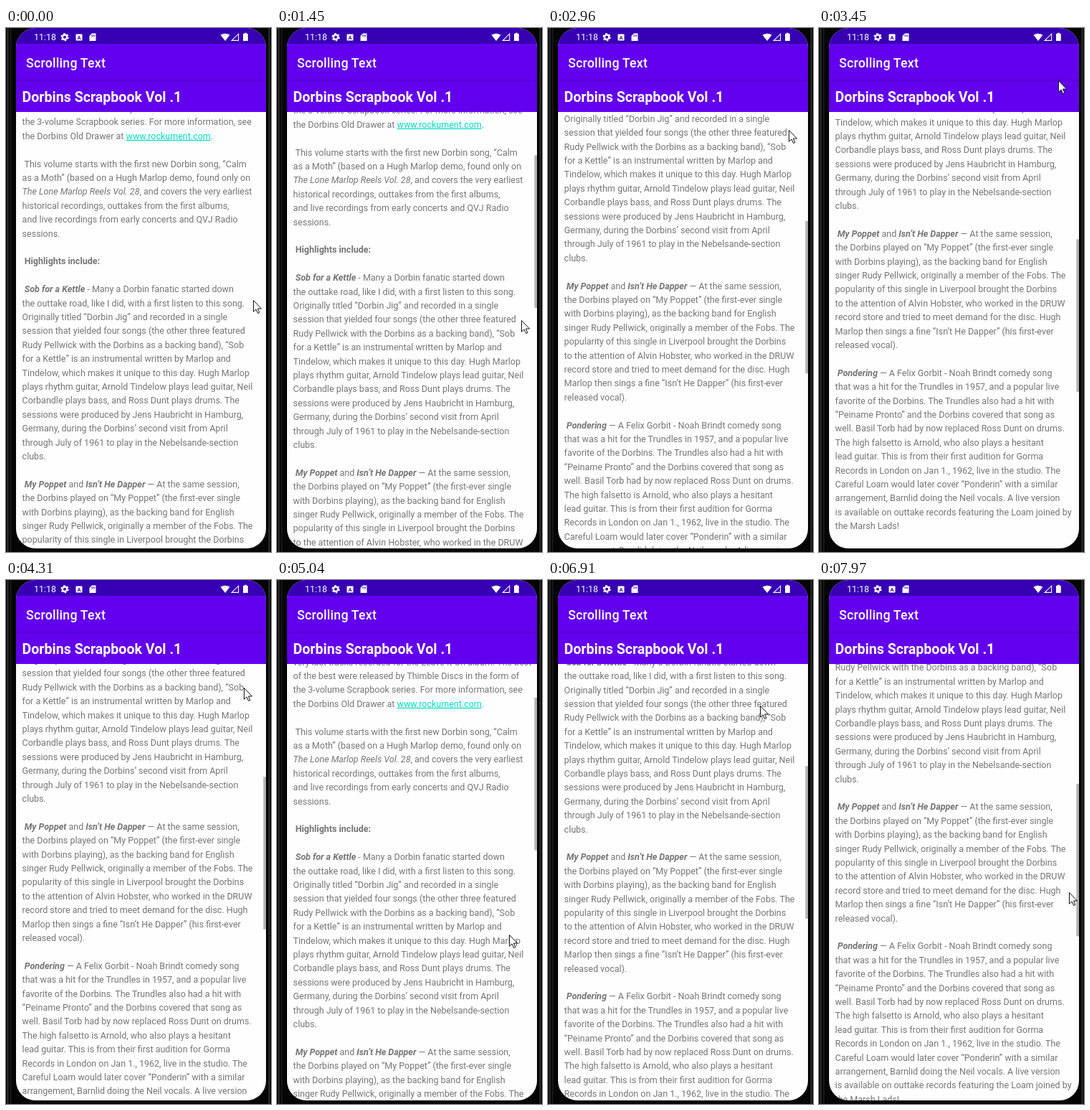
Write an HTML page that moves like this. It is 370 by 730 pixels and loops after 8 s.

```html
<!DOCTYPE html>
<html lang="en">
<head>
<meta charset="utf-8">
<title>Scrolling Text</title>
<style>
  html, body { margin: 0; width: 100%; height: 100%; overflow: hidden; background: #000; }
  svg { display: block; width: 370px; height: 730px; font-family: Roboto, sans-serif; }
  text { white-space: pre; }
  #article { font-size: 12.5px; fill: #757575; }
  .b { font-weight: 700; }
  .i { font-style: italic; }
  .link { fill: #03dac5; text-decoration: underline; }
</style>
</head>
<body>
<svg viewBox="0 0 370 730">
  <defs>
    <linearGradient id="shade" x2="0" y2="1">
      <stop offset="0" stop-color="#000" stop-opacity=".2"/>
      <stop offset="1" stop-color="#000" stop-opacity="0"/>
    </linearGradient>
    <clipPath id="screen"><rect x="14" y="0" width="349" height="725" rx="27"/></clipPath>
    <clipPath id="view"><rect x="14" y="117" width="349" height="608"/></clipPath>
  </defs>

  <rect width="370" height="730" fill="#050505"/>
  <path d="M2.5 0V730M367.5 0V730" stroke="#303030" stroke-width="2"/>
  <path d="M6.5 0V730" stroke="#191919" stroke-width="2"/>

  <g clip-path="url(#screen)">
    <rect x="14" width="349" height="730" fill="#fefefe"/>
    <g clip-path="url(#view)">
      <g id="article"></g>
      <rect id="thumb" x="359.3" width="3.7" height="212.5" fill="#b3b3b3"/>
    </g>
    <rect x="14" y="21" width="349" height="96" fill="#6200ee"/>
    <rect x="14" y="72" width="349" height="2" fill="url(#shade)"/>
    <rect x="14" width="349" height="22" fill="#3700b3"/>
    <g fill="#fff">
      <text x="39" y="17.3" font-size="12.4">11:18</text>
      <circle cx="82" cy="12.7" r="3.2" fill="none" stroke="#fff" stroke-width="2.4"/>
      <circle cx="82" cy="12.7" r="4.9" fill="none" stroke="#fff" stroke-width="1.6" stroke-dasharray="2.57 2.57"/>
      <rect x="97.5" y="8.5" width="9" height="9" rx="1"/>
      <text x="102" y="15.8" font-size="7.5" font-weight="700" text-anchor="middle" fill="#3700b3">A</text>
      <path d="M120 7.5H125.5V18H116.5V11Z"/>
      <path d="M119.8 9.5V12M121.7 9.5V12M123.6 9.5V12" stroke="#3700b3" stroke-width=".9"/>
      <path d="M299.5 9.8Q306 5.6 312.5 9.8L306 18Z"/>
      <path d="M324.6 8.2V17.4H315.2Z" fill="none" stroke="#fff" stroke-width="1.1"/>
      <path d="M331 8H332.8V6.8H336V8H337.8V18H331Z"/>
      <text x="28" y="54.6" font-size="17.8" font-weight="500" letter-spacing=".22">Scrolling Text</text>
      <text x="22.5" y="102.6" font-size="19.6" font-weight="700">Dorbins Scrapbook Vol .1</text>
    </g>
  </g>

  <path id="cursor" d="M.5 .5V16.2L4.1 12.9L6.6 18.5L8.9 17.5L6.5 12H11.5Z" fill="#fff" stroke="#111" stroke-width="1"/>
</svg>

<script>
const LOOP = 8000, LEAD = 19.4, TOP = 156;

// *bold*, _italic_, #bold italic#, ~link~
const lines = `In a vault deep inside Tolby Yard Studios in London —
protected by an unmarked, triple-locked, police-alarm-
protected door — are something like 400 hours of
unreleased Dorbins recordings, starting from June 2,
1962 and ending with the
very last tracks recorded for the Leave It On album. The best
of the best were released by Thimble Discs in the form of
the 3-volume Scrapbook series. For more information, see
the Dorbins Old Drawer at ~www.rockument.com~.

 This volume starts with the first new Dorbin song, “Calm
as a Moth” (based on a Hugh Marlop demo, found only on
_The Lone Marlop Reels Vol. 28_, and covers the very earliest
historical recordings, outtakes from the first albums,
and live recordings from early concerts and QVJ Radio
sessions.

* Highlights include:*

# Sob for a Kettle# - Many a Dorbin fanatic started down
the outtake road, like I did, with a first listen to this song.
Originally titled “Dorbin Jig” and recorded in a single
session that yielded four songs (the other three featured
Rudy Pellwick with the Dorbins as a backing band), “Sob
for a Kettle” is an instrumental written by Marlop and
Tindelow, which makes it unique to this day. Hugh Marlop
plays rhythm guitar, Arnold Tindelow plays lead guitar, Neil
Corbandle plays bass, and Ross Dunt plays drums. The
sessions were produced by Jens Haubricht in Hamburg,
Germany, during the Dorbins’ second visit from April
through July of 1961 to play in the Nebelsande-section
clubs.

# My Poppet# and #Isn’t He Dapper# — At the same session,
the Dorbins played on “My Poppet” (the first-ever single
with Dorbins playing), as the backing band for English
singer Rudy Pellwick, originally a member of the Fobs. The
popularity of this single in Liverpool brought the Dorbins
to the attention of Alvin Hobster, who worked in the DRUW
record store and tried to meet demand for the disc. Hugh
Marlop then sings a fine “Isn’t He Dapper” (his first-ever
released vocal).

# Pondering# — A Felix Gorbit - Noah Brindt comedy song
that was a hit for the Trundles in 1957, and a popular live
favorite of the Dorbins. The Trundles also had a hit with
“Peiname Pronto” and the Dorbins covered that song as
well. Basil Torb had by now replaced Ross Dunt on drums.
The high falsetto is Arnold, who also plays a hesitant
lead guitar. This is from their first audition for Gorma
Records in London on Jan 1., 1962, live in the studio. The
Careful Loam would later cover “Ponderin” with a similar
arrangement, Barnlid doing the Neil vocals. A live version
is available on outtake records featuring the Loam joined by
the Marsh Lads!

# Mend My Hat# — An early version of the song, played a bit
slower and with more of a blues feeling, and a cool`.split("\n");

const styles = [[/\*(.+?)\*/g, "b"], [/_(.+?)_/g, "i"], [/#(.+?)#/g, "b i"], [/~(.+?)~/g, "link"]];
const markup = s => styles.reduce((out, [re, cls]) => out.replace(re, (_, t) => `<tspan class='${cls}'>${t}</tspan>`), s);
const textLine = (s, y) => `<text x="22.6" y="${y.toFixed(1)}">${markup(s)}</text>`;

const $ = id => document.getElementById(id);
const article = $("article"), thumb = $("thumb"), cursor = $("cursor");
article.innerHTML = textLine("*Behind the Red Curtain: Dorbins Rarities!*", -18) +
  lines.map((s, i) => textLine(s, 135.4 + (i - 7) * LEAD)).join("");

// [time, x, y]
const pointer = [
  [0, 345, 379], [120, 345, 390], [640, 345, 435], [1060, 345, 435], [1180, 344, 431],
  [1450, 341, 407], [2440, 339, 238], [3440, 334, 73], [3830, 333, 48], [3950, 333, 50],
  [5030, 324, 494], [5660, 312, 608], [5900, 311, 619], [6020, 311, 621], [6160, 310, 612],
  [6910, 296, 175], [7300, 293, 111], [7660, 295, 103], [7820, 322, 270], [7970, 349, 435]
];
// [time, offset]
const scroll = [
  [0, 0], [1060, 0], [1180, 2], [1450, 16], [2440, 178], [3440, 349], [3830, 375], [3950, 375],
  [5030, -22], [5660, -140], [5900, -TOP], [6020, -TOP], [6160, -TOP + 2],
  [6910, 249.5], [7300, 304], [7660, 315], [7970, 319.5]
];

// Monotone cubic through the keys
function track(keys, t, c = 1) {
  const last = keys.length - 1;
  if (t >= keys[last][0]) return keys[last][c];
  const slope = k => (keys[k + 1][c] - keys[k][c]) / (keys[k + 1][0] - keys[k][0]);
  const tangent = k => {
    if (k === 0 || k === last) return 0;
    const a = slope(k - 1), b = slope(k);
    return a * b <= 0 ? 0 : 2 * a * b / (a + b);
  };
  const k = keys.findIndex((key, n) => t < keys[n + 1][0]);
  const h = keys[k + 1][0] - keys[k][0], u = (t - keys[k][0]) / h, v = 1 - u;
  return keys[k][c] * (1 + 2 * u) * v * v + keys[k + 1][c] * (3 - 2 * u) * u * u +
    h * u * v * (tangent(k) * v - tangent(k + 1) * u);
}

// The screen refreshes about every 120 ms, with a longer beat before each run
const runs = [0, 270, 1180, 1450, 1840, 2700, 2960, 3830, 5180, 6160, 6310, 7300, 7820, 7970, 8120];
const STEP = 120;
function snap(t) {
  const n = runs.findIndex(r => r > t), start = runs[n - 1];
  const most = Math.floor((runs[n] - start - 110) / STEP);
  return start + STEP * Math.max(0, Math.min(most, Math.floor((t - start) / STEP)));
}

function draw(ms) {
  const t = snap(ms % LOOP), y = track(scroll, t);
  article.setAttribute("transform", `translate(0 ${(-y).toFixed(1)})`);
  thumb.setAttribute("y", (117 + (y + TOP) * 0.351).toFixed(1));
  thumb.setAttribute("opacity", t < 1180 ? 0 : 1);
  cursor.setAttribute("transform", `translate(${Math.round(track(pointer, t, 1))} ${Math.round(track(pointer, t, 2))})`);
}

const began = performance.now();
function tick() {
  draw(performance.now() - began);
  requestAnimationFrame(tick);
}
tick();
</script>
</body>
</html>
```
